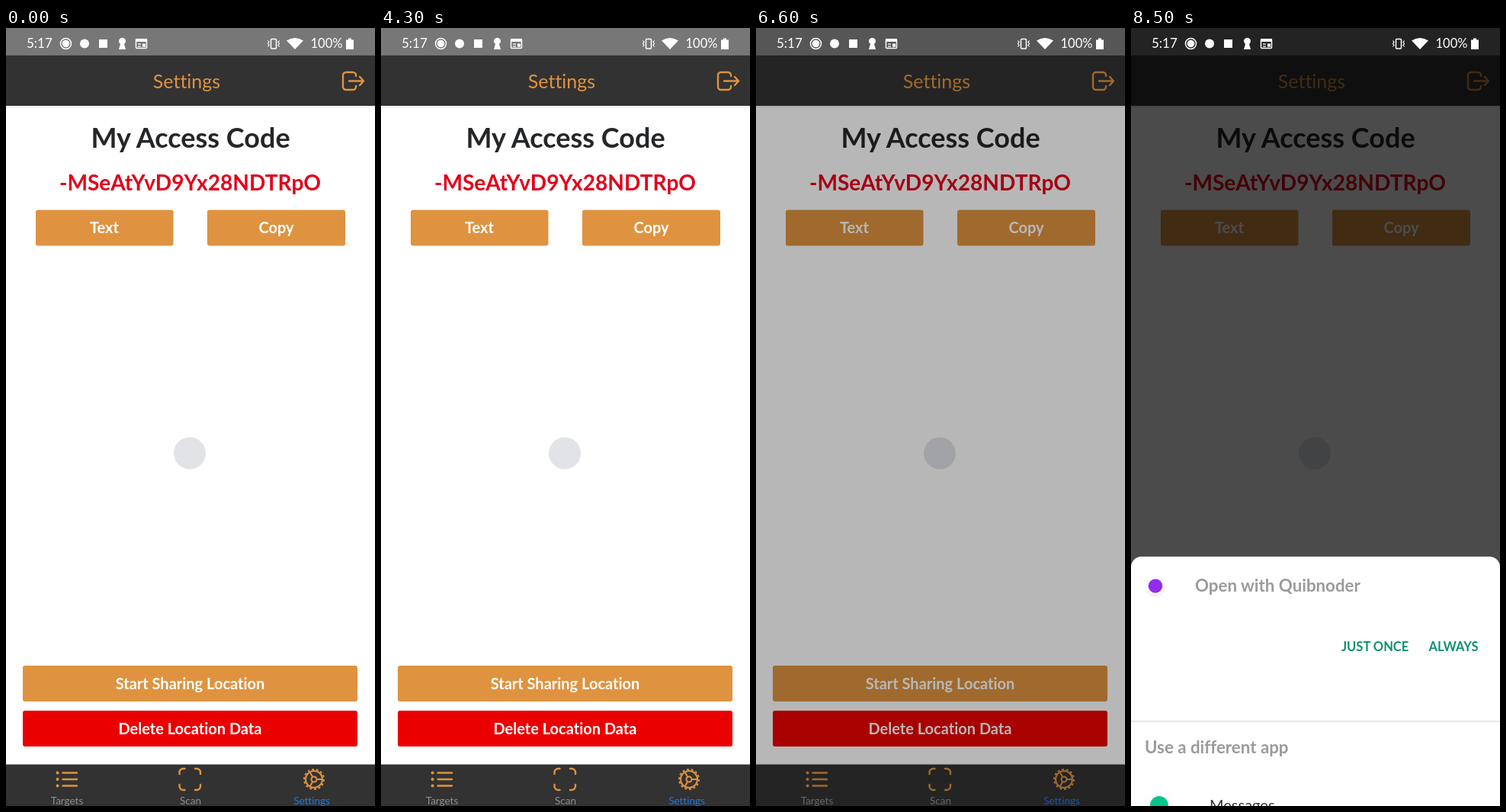
Recreate the animation shown at these times as an HTML page. Size 484 by 1020 pixels, loop 8600 ms.

```html
<!DOCTYPE html>
<html lang="en">
<head>
<meta charset="utf-8">
<title>Settings screen</title>
<style>
  html, body { margin: 0; width: 100%; height: 100%; overflow: hidden; background: #fff; }
  svg { display: block; font-family: Lato, "Open Sans", sans-serif; font-variant-ligatures: none; }
  .mid { text-anchor: middle; }
  .bold { font-weight: 700; }
  .btn { font-size: 20px; font-weight: 700; fill: #fff; }
  .tab { font-size: 13.5px; text-anchor: middle; fill: #8e8e90; }
  .line { fill: none; stroke: #df9340; stroke-width: 2.4; stroke-linecap: round; stroke-linejoin: round; }
  .gear { fill: none; stroke: #df9340; stroke-width: 2; }
  .thin { fill: none; stroke: #fff; stroke-width: 1.5; }
  .grey { font-size: 22.3px; font-weight: 700; fill: #9b9b9b; }
  .action { font-size: 16.5px; font-weight: 700; fill: #0f9070; }
  .shade { filter: drop-shadow(0 1px 1px #0002); }
</style>
</head>
<body>
<svg width="484" height="1020" viewBox="0 0 484 1020">
  <rect width="484" height="1020" fill="#fff"/>

  <!-- header -->
  <rect width="484" height="36" fill="#777"/>
  <rect y="36" width="484" height="66" fill="#323232" class="shade"/>
  <text x="237" y="79" class="mid" font-size="25" fill="#df9340">Settings</text>
  <path class="line" d="M459 63v-1a4 4 0 0 0-4-4h-9a4 4 0 0 0-4 4v15a4 4 0 0 0 4 4h9a4 4 0 0 0 4-4v-1M450 69.500h19M464 64l5 5.500l-5 5.500"/>

  <!-- content -->
  <text x="242" y="157" class="mid bold" font-size="36" fill="#242628">My Access Code</text>
  <text x="241.500" y="213" class="mid bold" font-size="28.100" fill="#e2001a">-MSeAtYvD9Yx28NDTRpO</text>
  <g fill="#df9340">
    <rect x="39" y="238.500" width="180.500" height="47" rx="3"/>
    <rect x="264" y="238.500" width="181" height="47" rx="3"/>
    <rect x="22" y="836" width="439" height="47" rx="3"/>
    <rect x="22" y="895" width="439" height="47" rx="3" fill="#eb0000"/>
  </g>
  <text x="129" y="269" class="btn mid">Text</text>
  <text id="copy" x="354.500" y="269" class="btn mid">Copy</text>
  <g id="copied">
    <circle class="thin" cx="318" cy="262" r="9"/>
    <path class="thin" d="M313.500 262.500l3 3.500l6-7.500"/>
    <text x="331" y="269" class="btn">Copied!</text>
  </g>
  <circle cx="241" cy="557.500" r="21" fill="#e2e3e7"/>
  <text x="241.500" y="867" class="btn mid">Start Sharing Location</text>
  <text x="241.500" y="926" class="btn mid">Delete Location Data</text>

  <!-- tab bar -->
  <rect y="965.500" width="484" height="55" fill="#323232"/>
  <path class="line" d="M74.500 976.500h18.500M74.500 985h18.500M74.500 993.500h18.500"/>
  <path class="line" style="stroke-width:4" d="M67.500 976.500h.1M67.500 985h.1M67.500 993.500h.1"/>
  <path class="line" d="M227.500 978v-2a5 5 0 0 1 5-5h2M248 971h2a5 5 0 0 1 5 5v2M255 992v2a5 5 0 0 1-5 5h-2M234.500 999h-2a5 5 0 0 1-5-5v-2"/>
  <g transform="translate(404 985)" class="gear">
    <circle r="11"/>
    <circle r="13" pathLength="28" stroke-dasharray="1 1"/>
    <circle r="3.500"/>
    <path d="M3.500 0h6.500M-1.750 -3.030l-3.250 -5.630M-1.750 3.030l-3.250 5.630"/>
  </g>
  <text x="80" y="1018" class="tab">Targets</text>
  <text x="242" y="1018" class="tab">Scan</text>
  <text x="401" y="1018" class="tab" style="fill:#1877ea">Settings</text>

  <rect id="dim" width="484" height="1020" opacity="0"/>

  <!-- status icons stay bright above the dimming -->
  <g fill="#fff">
    <text x="27" y="26" font-size="17">5:17</text>
    <circle class="thin" cx="78.500" cy="20.500" r="7"/>
    <circle cx="78.500" cy="20.500" r="4.800"/>
    <circle cx="103" cy="20.500" r="6"/>
    <rect x="122" y="15" width="11" height="11"/>
    <path d="M150 21a4.500 4.500 0 1 1 5 0l2 7h-9z"/>
    <rect class="thin" x="170.500" y="15" width="14" height="11.500" rx="1"/>
    <path d="M170 14h15v4h-15zM173 20.500h4v1.300h-4zM173 23.500h4v1.300h-4zM179 20.500h4v4.300h-4z"/>
    <rect class="thin" x="347.500" y="14.500" width="7" height="12.500" rx="1"/>
    <path class="thin" style="stroke-width:1.200" d="M343.500 16.500l1.500 2l-1.500 2l1.500 2l-1.500 2M358.500 16.500l-1.500 2l1.500 2l-1.500 2l1.500 2"/>
    <path d="M368 16.500q11-7 22 0l-11 11.500z"/>
    <text x="399.500" y="26" font-size="16.500">100%</text>
    <path d="M446 15.500h3v-2h4v2h3v12.500h-10z"/>
  </g>

  <!-- bottom sheet, placed by its top edge -->
  <g id="sheet">
    <rect width="484" height="400" rx="14" fill="#fff"/>
    <circle class="shade" cx="32" cy="39" r="12" fill="#fff"/>
    <circle cx="32" cy="38.500" r="9.300" fill="#932cf0"/>
    <text x="84" y="46" class="grey">Open with Quibnoder</text>
    <text x="276" y="123.500" class="action">JUST ONCE</text>
    <text x="390.500" y="123.500" class="action">ALWAYS</text>
    <path d="M0 216h484" stroke="#dedede" stroke-width="1.500"/>
    <text x="18" y="258" class="grey">Use a different app</text>
    <circle class="shade" cx="37" cy="326" r="17" fill="#fff"/>
    <circle cx="37" cy="326" r="12" fill="#05c68c"/>
    <text x="103" y="333" font-size="20" fill="#333">Messages</text>
  </g>
</svg>
<script>
  const LOOP = 8600;
  const [copy, copied, dim, sheet] =
    ["copy", "copied", "dim", "sheet"].map(id => document.getElementById(id));
  const progress = (t, start, length) => Math.min(1, Math.max(0, (t - start) / length));
  const show = (node, on) => node.setAttribute("visibility", on ? "visible" : "hidden");

  function draw(t) {
    const isCopied = t >= 1900 && t < 3500;
    show(copy, !isCopied);
    show(copied, isCopied);
    dim.setAttribute("opacity", 0.705 * progress(t, 6440, 400));
    const left = (1 - progress(t, 6855, 500)) ** 2;
    show(sheet, left < 1);
    sheet.setAttribute("transform", `translate(0 ${693 + 327 * left})`);
  }

  const begin = performance.now();
  function frame() {
    draw((performance.now() - begin) % LOOP);
    requestAnimationFrame(frame);
  }
  frame();
</script>
</body>
</html>
```
